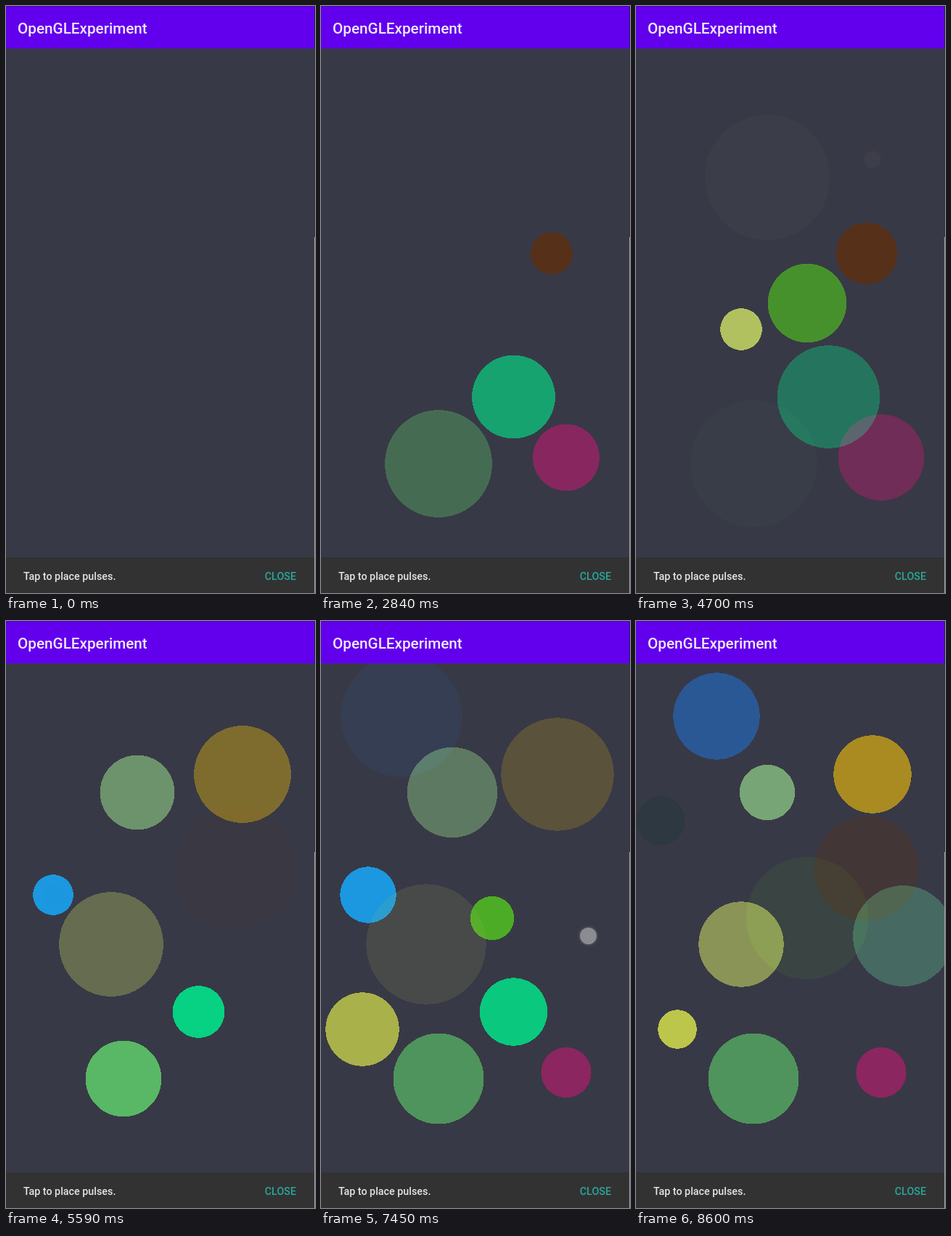
An HTML page with a canvas that plays this animation: 426 by 808 pixels, repeating every 8.62 s.

```html
<!DOCTYPE html>
<html lang="en">
<head>
<meta charset="utf-8">
<title>Pulses</title>
<style>
  html, body { margin: 0; width: 100%; height: 100%; overflow: hidden; background: #383946; }
  canvas { position: absolute; left: 0; top: 0; }
  .bar { position: absolute; left: 0; width: 426px; box-sizing: border-box; white-space: nowrap;
         font-family: Roboto, sans-serif; }
  .bar span { position: absolute; }
  #top { top: 0; height: 59px; background: #6200ee; border-top: 1px solid #4a08b8; border-bottom: 1px solid #46249c; }
  #snack { top: 759px; height: 49px; background: #323232; }
  #title { left: 16px; top: 18px; font-weight: 500; font-size: 20.7px; line-height: 24px; color: #f3eaff; }
  #snack span { top: 16px; font-weight: 500; font-size: 14.3px; line-height: 20px; }
  #note { left: 24px; color: #e4e4e4; }
  #close { right: 26px; color: #2ba698; }
  #edge { position: absolute; left: 425px; top: 0; width: 1px; height: 808px;
          background: linear-gradient(#241a5c 58px, #30303e 58px 318px, #9c9ca2 318px); }
</style>
</head>
<body>
<canvas id="stage" width="426" height="808"></canvas>
<div class="bar" id="top"><span id="title">OpenGLExperiment</span></div>
<div class="bar" id="snack"><span id="note">Tap to place pulses.</span><span id="close">CLOSE</span></div>
<div id="edge"></div>
<script>
const W = 426, TOP = 59, H = 700, LOOP = 8620;
const R_MIN = 11, R_SPAN = 78, R_SHOWN = 26.5;
const HOLD = 374.5; // growth at which the two oldest pulses stop
const BG = rgb('#383946');

const ctx = document.getElementById('stage').getContext('2d');
const image = ctx.createImageData(W, H);
const pixels = image.data.fill(255);

// start is the overall growth, in pixels, at the moment of the tap
const tap = (x, y, start, hex) => ({ x, y, start, color: rgb(hex) });
const pulses = [
  tap(162, 630, 11, '#5fd56c'),
  tap(338, 621.5, 39, '#8c2660'),
  tap(145, 445, 69.5, '#b2c15f'),
  tap(265.5, 538, 105.5, '#07d182'),
  tap(318, 340.5, 134, '#563019'),
  tap(181, 236, 168, '#78a575'),
  tap(236, 409, 200, '#4cac26'),
  tap(326, 211, 230.5, '#c8a217'),
  tap(65, 377, 269.5, '#1b98e0'),
  tap(111, 131, 302.5, '#2269c0'),
  tap(57, 562, 335.5, '#bcc64b'),
  tap(368.5, 433.5, 370.8, '#59a986'),
  tap(34, 275, 406.8, '#2d3840')
];

function rgb(hex) {
  return [1, 3, 5].map(i => parseInt(hex.slice(i, i + 2), 16));
}

// Nearly steady growth that slows a little over the loop.
const growth = t => 9 + t * (0.051 - 2.5e-7 * t);

function visiblePulses(g) {
  return pulses.map((p, i) => {
    const age = (i < 2 ? Math.min(g, HOLD) : g) - p.start;
    const r = R_MIN + age % R_SPAN;
    const alpha = Math.min(1, (88.3 - r) / 44.3);
    return { ...p, r, alpha, shown: age >= 0 && r > R_SHOWN && alpha > 0 };
  }).filter(p => p.shown);
}

// Shades each pixel: overlapping colours average by weight, then cover the backdrop.
function drawPulses(g) {
  const shown = visiblePulses(g);
  for (let y = 0, k = 0; y < H; y++) {
    const row = shown.map(p => ({ ...p, half: Math.sqrt(p.r ** 2 - (y + TOP + 0.5 - p.y) ** 2) }))
      .filter(p => p.half > 0);
    for (let x = 0; x < W; x++, k += 4) {
      let weight = 0, red = 0, green = 0, blue = 0;
      for (const { x: cx, half, alpha, color } of row) {
        if (Math.abs(x + 0.5 - cx) > half) continue;
        weight += alpha;
        red += alpha * color[0];
        green += alpha * color[1];
        blue += alpha * color[2];
      }
      const rest = Math.max(0, 1 - weight), scale = Math.max(1, weight);
      pixels[k] = BG[0] * rest + red / scale;
      pixels[k + 1] = BG[1] * rest + green / scale;
      pixels[k + 2] = BG[2] * rest + blue / scale;
    }
  }
  ctx.putImageData(image, 0, TOP);
}

function disc(x, y, r, fill) {
  ctx.fillStyle = fill;
  ctx.beginPath();
  ctx.arc(x, y, r, 0, 2 * Math.PI);
  ctx.fill();
}

function drawTouches(g) {
  for (const { x, y, start } of pulses) {
    const ms = (g - start - 2) * 20;
    if (ms < -5 || ms > 300) continue;
    const alpha = 0.5 * Math.min(1, Math.exp((30 - ms) / 60));
    disc(x, y, 14, `rgba(110,110,110,${alpha * 0.6})`);
    disc(x, y, 11.5, `rgba(255,255,255,${alpha})`);
  }
}

const begin = performance.now();
(function tick() {
  const g = growth((performance.now() - begin) % LOOP);
  drawPulses(g);
  drawTouches(g);
  requestAnimationFrame(tick);
})();
</script>
</body>
</html>
```
